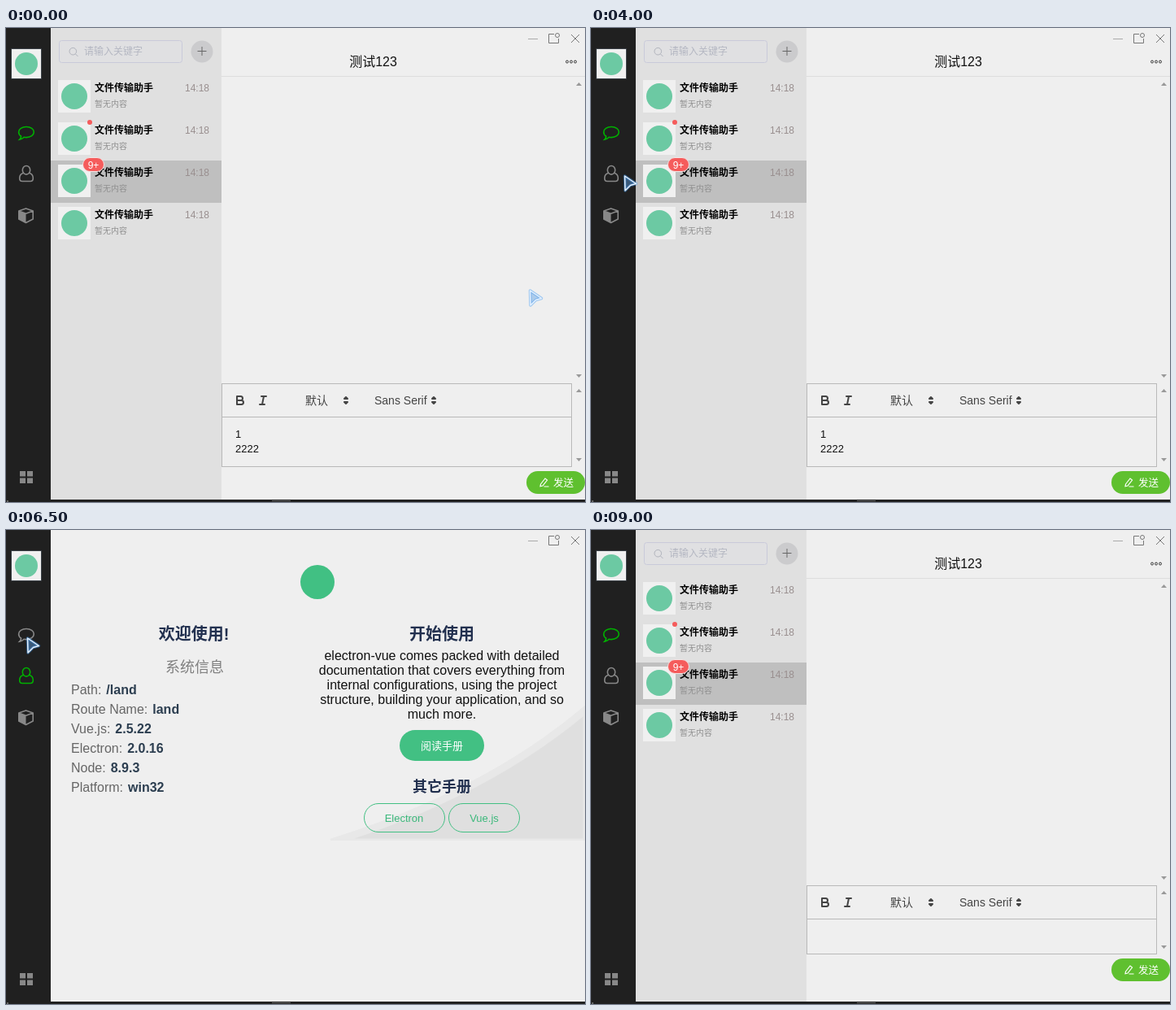
Animation of 712 by 583 pixels, one loop 9500 ms. Source, as an HTML page:

```html
<!DOCTYPE html>
<html lang="zh-CN">
<head>
<meta charset="utf-8">
<title>Chat client</title>
<style>
html, body { margin: 0; width: 100%; height: 100%; overflow: hidden; background: #efefef; }
svg { display: block; }
text { font-family: "Liberation Sans", "Noto Sans CJK SC", "Noto Sans CJK", sans-serif; white-space: pre; }
.mid { text-anchor: middle; }
.b { font-weight: bold; }
.line { fill: none; stroke: currentColor; }
.nav { color: #888; }
.nav.on { color: #00b000; }
</style>
</head>
<body>
<svg id="stage" width="712" height="583" viewBox="0 0 712 583">
  <rect width="712" height="583" fill="#efefef"/>

  <g id="chat">
    <rect x="55" width="210" height="580" fill="#e0e0e0"/>
    <rect x="65.5" y="15.5" width="151" height="27" rx="3" fill="#e0e0e2" stroke="#c9cada"/>
    <g class="line" color="#b0b3bc"><circle cx="82.3" cy="28.7" r="4.3"/><path d="M85.5 32l3 3"/></g>
    <text x="96" y="33" font-size="12" fill="#b4b7c2">请输入关键字</text>
    <circle cx="241" cy="29" r="13.5" fill="#cbcbcd"/>
    <path class="line" color="#666" d="M235.500 28.500h11M241 23v11"/>
    <g id="rows"></g>
    <circle cx="103" cy="116" r="3" fill="#f55c5c"/>
    <rect x="94.500" y="159.500" width="26" height="17" rx="8.500" fill="#f55c5c" stroke="#f4e4e4"/>
    <text class="mid" x="107.500" y="172.500" font-size="12" fill="#fff">9+</text>

    <text class="mid" x="451.500" y="47" font-size="16" fill="#111">测试123</text>
    <g class="line" color="#333"><circle cx="690" cy="41.500" r="1.500"/><circle cx="695" cy="41.500" r="1.500"/><circle cx="700" cy="41.500" r="1.500"/></g>
    <path class="line" color="#ddd" d="M265 59.500h447"/>

    <path class="line" color="#b9b9b9" d="M265.500 478.500h430"/>
    <rect id="editor" class="line" color="#b9b9b9" x="265.500" y="437.500" width="430"/>
    <g class="line" color="#444" stroke-width="2" stroke-linejoin="round" stroke-linecap="round">
      <path transform="translate(279 449)" d="M5 4h4.500a2.500 2.500 0 0 1 0 5H5zM5 9h5.500a2.500 2.500 0 0 1 0 5H5z"/>
      <path transform="translate(307 449)" d="M7 4h6M5 14h6M8 14l2-10"/>
      <g id="pickers" fill="#444"></g>
    </g>
    <text x="368" y="463" font-size="14" fill="#444">默认</text>
    <text x="453" y="463" font-size="14" fill="#444">Sans Serif</text>
    <g id="typed" font-size="13" fill="#111">
      <text x="282" y="504">1</text>
      <text x="282" y="522">2222</text>
    </g>
    <rect id="caret" x="310" y="510" width="1" height="15" fill="#000"/>
    <path fill="#999" d="M701 71h7l-3.500-4zM701 426h7l-3.500 4zM701 448h7l-3.500-4z"/>
    <g id="footer">
      <path fill="#999" d="M701 529h7l-3.500 4z"/>
      <rect x="640" y="545" width="72" height="28" rx="14" fill="#5fc02f"/>
      <path class="line" color="#fff" stroke-width="1.200" d="M657.500 561l5.500-7 2.500 2-5.500 7-3 .8zM661.500 564h6"/>
      <text x="673" y="563.500" font-size="12.500" fill="#fff">发送</text>
    </g>
  </g>

  <g id="land">
    <svg width="712" height="382">
      <path d="M400 384Q590 325 714 220V384z" fill="#dfdfdf" stroke="#e8e8e8" stroke-width="9"/>
    </svg>
    <circle cx="383" cy="64" r="21" fill="#41c083"/>
    <g class="mid b" fill="#22304f">
      <text x="231" y="135" font-size="20">欢迎使用!</text>
      <text x="536" y="135" font-size="20">开始使用</text>
      <text x="536" y="322" font-size="18">其它手册</text>
    </g>
    <text class="mid" x="232" y="175" font-size="18" fill="#808080">系统信息</text>
    <g id="info" font-size="16" fill="#666"></g>
    <g id="intro" class="mid" font-size="16" fill="#111"></g>
    <rect x="484" y="246" width="104" height="38" rx="19" fill="#42c083"/>
    <g class="line" color="#42c083">
      <rect x="440.500" y="336.500" width="99" height="35" rx="17.500"/>
      <rect x="544.500" y="336.500" width="87" height="35" rx="17.500"/>
    </g>
    <g class="mid" font-size="13" fill="#3bb87b">
      <text x="536" y="270" fill="#fff">阅读手册</text>
      <text x="489.500" y="359">Electron</text>
      <text x="588" y="359">Vue.js</text>
    </g>
  </g>

  <g id="apps" class="mid b" font-size="32">
    <text x="384" y="59">123</text>
    <text x="384" y="96">456</text>
  </g>

  <g class="line" color="#777">
    <path color="#aaa" stroke="#aaa" d="M642 13.500h12"/>
    <path d="M674 7.500h-6.500v11h12V13M695 8l10 10M705 8l-10 10"/>
    <circle cx="678" cy="9" r="2.500"/>
  </g>
  <path fill="#202020" d="M0 0H55V580H712V583H0z"/>
  <path fill="#666" d="M327 581h23v1h-23zM1 581h2v2h-2z"/>
  <rect x="6" y="25" width="38" height="38" rx="1" fill="#3c4248"/>
  <rect x="7" y="26" width="36" height="36" fill="#f0f0f0"/>
  <circle cx="25" cy="44" r="14" fill="#6cc9a3"/>

  <g class="nav" data-page="chat">
    <path class="line" stroke-width="1.600" d="M25 121.500c5.300 0 9.300 2.900 9.300 6.500s-4 6.600-9.300 6.600c-1 0-2-.1-2.900-.3-1.300 1.500-3 2.400-5.300 2.800 1.100-1.100 1.700-2.300 1.800-3.900-1.900-1.200-3-3-3-5.200 0-3.600 4.100-6.500 9.400-6.500z"/>
  </g>
  <g class="nav" data-page="land">
    <path class="line" stroke-width="1.600" d="M21 178.500c-3 .8-4.300 3.200-4.300 6.300 0 2.300 1.300 3.700 3.200 3.700h10.200c1.900 0 3.200-1.400 3.200-3.700 0-3.100-1.300-5.500-4.300-6.300"/>
    <ellipse class="line" stroke-width="1.600" cx="25" cy="174.800" rx="4.700" ry="5.300"/>
  </g>
  <g class="nav" data-page="apps">
    <path class="line" stroke-width="1.600" stroke-linejoin="round" d="M24.500 222l8.700 3v10l-8.700 4.500-8.700-4.500V225zM15.800 225l8.700 3.200 8.700-3.200"/>
    <path fill="currentColor" d="M15.500 225l9 3.200V240l-9-4.800z"/>
  </g>
  <path class="nav" data-page="apps" fill="currentColor" d="M17 545h7v6.500h-7zM26 545h7v6.500h-7zM17 553.500h7v6.500h-7zM26 553.500h7v6.500h-7z"/>

  <g id="cursor" stroke-linejoin="round">
    <path d="M1.500 2L15.500 11.500 8.500 13.500 2 20z" fill="none" stroke="#3c96f0" stroke-opacity=".45" stroke-width="3.500"/>
    <path d="M1.500 2L15.500 11.500 8.500 13.500 2 20z" fill="#5aa0e6" fill-opacity=".45" stroke="#e4f1ff" stroke-width="1.500"/>
  </g>
</svg>
<script>
const $ = id => document.getElementById(id);
const fill = (id, items, draw) => $(id).innerHTML = items.map(draw).join('');

fill('rows', [59, 111, 163, 215], y => `
  <g transform="translate(55 ${y})">
    ${y === 163 ? '<rect width="210" height="52" fill="#bfbfbf"/>' : ''}
    <rect x="9" y="5" width="40" height="40" fill="#f0f0f0"/>
    <circle cx="29" cy="25" r="16" fill="#6cc9a3"/>
    <text class="b" x="54" y="19" font-size="12">文件传输助手</text>
    <text x="165" y="19" font-size="12" fill="#998f8f">14:18</text>
    <text x="54" y="38" font-size="10" fill="#909090">暂无内容</text>
  </g>`);

fill('pickers', [409, 517], x =>
  `<path transform="translate(${x} 449)" d="M7 11l2 2 2-2zM7 7l2-2 2 2z"/>`);

fill('info', [
  ['Path', '/land'], ['Route Name', 'land'], ['Vue.js', '2.5.22'],
  ['Electron', '2.0.16'], ['Node', '8.9.3'], ['Platform', 'win32']
], ([key, value], i) =>
  `<text x="80" y="${202 + 24 * i}">${key}:<tspan class="b" dx="6" fill="#2c3e50">${value}</tspan></text>`);

fill('intro', [
  'electron-vue comes packed with detailed',
  'documentation that covers everything from',
  'internal configurations, using the project',
  'structure, building your application, and so',
  'much more.'
], (line, i) => `<text x="536" y="${160 + 18 * i}">${line}</text>`);

// One pointer position per half second; the pointer has left the window at the end.
const STEP = 500, LOOP = 9500;
const pointer = [
  [643, 321], [308, 379], [334, 508], [189, 270], [158, 181], [191, 122], [153, 181],
  [150, 239], [40, 180], [22, 189], [16, 230], [16, 230], [25, 176], [25, 131],
  [25, 131], [150, 82], [207, 119], [159, 154], null
];
const pageAt = step =>
  step < 9 || step > 13 ? 'chat' : step === 11 || step === 12 ? 'apps' : 'land';
const show = (id, on) => $(id).style.display = on ? '' : 'none';

function draw(step) {
  const page = pageAt(step), typed = step < 9, pos = pointer[step];
  for (const id of ['chat', 'land', 'apps']) show(id, id === page);
  for (const icon of document.querySelectorAll('.nav'))
    icon.classList.toggle('on', icon.dataset.page === page);
  show('typed', typed);
  show('caret', step === 3);
  $('editor').setAttribute('height', typed ? 102 : 84);
  $('footer').setAttribute('transform', `translate(0 ${typed ? 0 : -18})`);
  show('cursor', pos);
  if (pos) $('cursor').setAttribute('transform', `translate(${pos})`);
}

const start = performance.now();
let last = -1;
function tick() {
  const step = Math.floor((performance.now() - start) % LOOP / STEP);
  if (step !== last) draw(last = step);
  requestAnimationFrame(tick);
}
tick();
</script>
</body>
</html>
```
